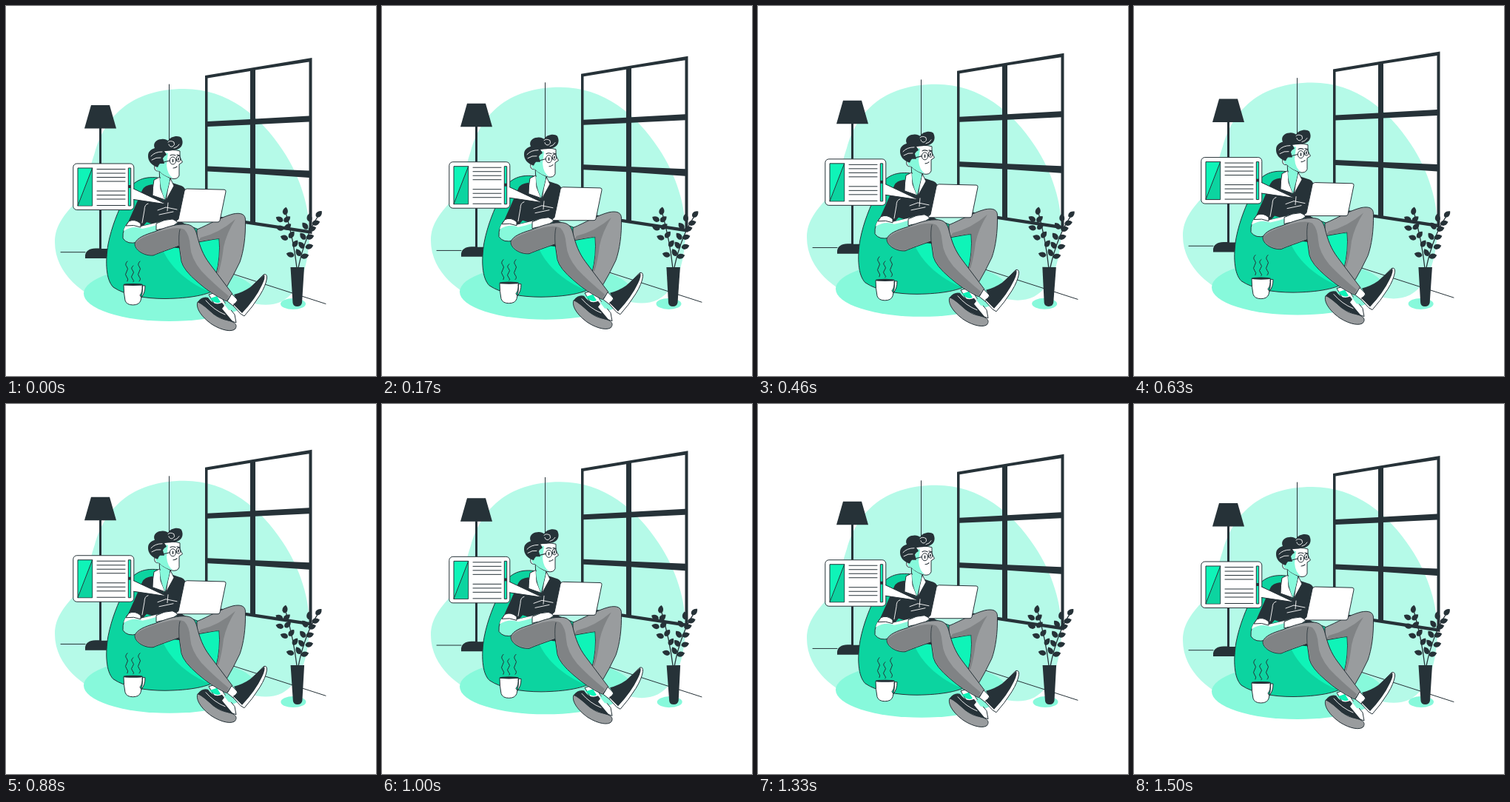
Write an HTML page that moves like this. It is 500x500 px and loops after 1.54 s.

```html
<!DOCTYPE html>
<html lang="en">
<head>
<meta charset="utf-8">
<style>
  html, body { margin: 0; width: 100%; height: 100%; overflow: hidden; background: #fff; }
  svg { display: block; width: 100vw; height: 100vh; }
  .ink { fill: #263238; }
  .line { fill: none; stroke: #263238; stroke-linecap: round; stroke-linejoin: round; }
  .edge { stroke: #263238; stroke-width: 1; stroke-linejoin: round; }
  .thin { fill: none; stroke: #fff; stroke-width: .9; stroke-linecap: round; }
  .white { fill: #fff; }
  .pale { fill: #b5fae8; }
  .mint { fill: #87f9db; }
  .bright { fill: #0ff4b8; }
  .green { fill: #0cd4a0; }
  .gray { fill: #999c9e; }
  .shade { fill: #808385; }
</style>
</head>
<body>
<svg viewBox="0 0 500 500">
  <g id="room">
    <path class="pale" d="M66 319C66 296 80 281 94 265C108 247 112 222 120 198C133 152 167 112 241 112C300 112 344 149 374 195C398 231 411 273 410 312C408 354 397 386 373 399C350 410 326 400 304 392L130 400C108 390 66 364 66 319Z"/>
    <ellipse class="mint" cx="221" cy="388.500" rx="116" ry="37.500"/>
    <path class="line" d="M220.500 106V185M74 332.700H107M300 360L432 402.500"/>

    <g class="ink">
      <path d="M115 134H140L149 165.500H106Z"/>
      <path d="M126 165H129V328H137.500V341H107V337Q108 328 121 327.500H126Z"/>
      <path fill-rule="evenodd" d="M269 94L413.500 70V308L269 286Z
        M272.500 97.500V156L330 153V88ZM337 86.500V152.500L409.500 148.500V75.500Z
        M272.500 163V216.500L330 219V160.500ZM337 160V219.500L409.500 222.500V156.500Z
        M272.500 223.500V282L330 291V226.500ZM337 227V292L409.500 303V232Z"/>
    </g>

    <!-- beanbag -->
    <path class="green edge" d="M205 232C185 230 170 236 161 257C151 279 143 297 138 322C134 346 135 370 145 380C161 391 188 395.500 215 395.500C248 395 274 391 289 380L300 330L288 313L230 290Z"/>
    <path class="bright" d="M212 330C221 350 240 370 270 384Q283 385 289 379L296 318L260 313Z"/>

    <!-- far leg and shoe -->
    <path class="gray edge" d="M258 315V302C275 295 291 285 307 281C317 279 324 281 323.500 290C324 312 321 332 316 346Q307 365 298 380L284 362Q290 340 288 314L260 319Z"/>
    <path class="shade" d="M260 318L263 313Q288 307 310 288Q298 307 294 326Q292 345 287 361L285 360Q290 338 288.500 314Z"/>
    <path class="white edge" d="M274 390L287 386L295 400L309 417L311 428L292 421Z"/>
    <path class="gray edge" d="M259 400C256 408 264 420 278 430C292 439 306 441 310 436C314 429 306 426 296 424C280 421 268 401 259 400Z"/>
    <path class="ink" d="M259 400Q265 392 273 394Q281 406 292 401L295 405L292 409L307 427Q292 424 281 417Q268 405 259 400Z"/>
    <path class="bright" d="M276 395L285 392L290 400Q283 404 276 395Z"/>
    <path class="thin" d="M270 398Q281 411 296 417"/>
    <path class="mint" d="M294 402L313 402L308 411L301 411Z"/>

    <!-- head -->
    <path class="mint edge" d="M207 219L208 240L213 262L222 239V231Z"/>
    <path class="white edge" d="M212 196Q225 193 235 196L235 205L238.500 211L234 214L234 229Q232 235 223 233Q211 228 207 223Q199 224 201 215L207 204Z"/>
    <path class="mint" d="M202 214Q205 211 208 213L213 205L215 198L219 199L217 215Q218 228 226 233Q213 230 207 223Q201 223 202 214Z"/>
    <path class="ink" d="M205 218C196 215 192 209 192 203C192 196 196 194 201 192C198 186 203 180 210 180C214 179 217 181 219 182C222 176 233 174 237 178C241 186 237 192 231 194Q222 196 214 196L217 201Q213 203 212 206L214 213L208 213Q206 215 205 218Z"/>
    <path class="thin" d="M196 203Q201 197 211 197M197 208Q203 204 209 205M219 184Q222 181 227 184Q229 188 225 190Q221 191 220 187M227 192Q232 191 234 187"/>
    <g class="line">
      <ellipse cx="225.500" cy="209" rx="4.200" ry="5"/>
      <ellipse cx="233" cy="206.500" rx="2.800" ry="4"/>
      <path d="M213 211L221 209M229.500 207.500H231M222 202Q225 200 229 202M231 201L235 202M226 219Q229 219 231 217" stroke-width="1.100"/>
      <path d="M225.500 207.500V210.500M233 205.500V208" stroke-width="1.600"/>
    </g>

    <!-- torso -->
    <path class="ink" d="M198 241Q187 242 184 249Q175 270 165 292L184 299L190 292L215 300L214 325L240 328L246 300L236 290L243 250Q241 243 234 242L222 238L213 263Z"/>
    <path class="white edge" d="M200 235L208 231L209 247L215 262L198 256Q198 245 200 235ZM222 233L227 243L216 263Q218 248 222 233Z"/>
    <path class="mint" d="M208 233L221 236L215 262Q208 247 208 233Z"/>
    <path class="thin" d="M192 267Q187 268 187 276L184 293M205 276L216 272L231 275M219 266L218 277M207 282L226 278"/>

    <!-- forearm -->
    <path class="mint edge" d="M166 291Q157 301 158 314Q164 323 178 319L205 307L231 295Q232 290 224 289Q212 289 203 293L182 298Z"/>
    <path class="white" d="M167 291Q160 297 159 304Q172 296 184 301Q204 297 215 291L203 293L182 298Z"/>
    <path class="white edge" d="M166 291Q174 287 182 294L182 299Q173 295 162 297Z"/>
    <path class="white edge" d="M203 294Q214 288 225 288L233 292L226 297L214 301Q208 301 203 303Z"/>

    <path class="white edge" d="M244.500 247L295 248.200Q297.500 248.500 297 251L289 290Q288.500 292 286 292H231Q228.500 291 233 288L241 250Q242 247 244.500 247Z"/>

    <!-- near leg and shoe -->
    <path class="gray edge" d="M174 321C177 313 188 309 201 305C216 299 228 295 239 295C252 294 256 301 258 309C262 325 266 336 275 348L306 389L298 399Q277 389 259 373Q240 357 237 345L234 324C220 329 208 333 199 337C187 338 174 330 174 321Z"/>
    <path class="shade" d="M175 321C180 313 199 307 217 302Q233 298 241 302Q248 309 249 325Q250 341 264 358Q279 374 301 392L298 398Q277 388 259 372Q241 357 238 345L234.500 323Q214 330 199 336C187 337 175 329 175 321Z"/>
    <path class="line" d="M234 324Q233 309 235 302" stroke-width=".8"/>
    <path class="white edge" d="M305 389L313 397L308 406L299 399Z"/>
    <path class="white edge" d="M348 363Q353 361 352.500 368Q351 378 343 391Q333 407 322 419L317 416L307 405Z"/>
    <path class="ink" d="M308 390Q320 387 330 380Q341 370 349 363Q351 367 346 377Q337 396 319 415L307 403L313 399Z"/>

    <!-- mug -->
    <path class="white edge" d="M184 378H188Q188 388 183 394L181 391Q185 386 184 378ZM159 377Q159 388 161 398Q163 404 171.500 404Q180 404 182 398Q185 388 184.500 377Z"/>
    <ellipse class="ink" cx="171.700" cy="376.500" rx="13" ry="1.600"/>
    <path class="line" d="M164 345q-4 4-1 7t0 7t0 7t1 6M172 351q-4 3-1 6t0 6t0 6t1 4M181 345q-4 4-1 7t0 7t0 7t0 6"/>

    <!-- card -->
    <rect class="white edge" x="90.800" y="213" width="82" height="62.500" rx="5"/>
    <path class="bright edge" d="M97 219H116.700V270H97ZM165.300 219H168.700V270H165.300Z"/>
    <path class="green" d="M116.200 221V269.500H98Z"/>
    <path class="line" d="M116.700 219L97 270M123 220.500H161M123 226H161M123 231.500H161M123 237H161M123 250H161M123 255.500H161M123 261H161M123 269.500H161"/>
    <path class="white" d="M170 246L217 268L170 261Z"/>
    <path class="line" d="M172.500 247L217 268L172.500 261.500"/>
    <path class="ink" d="M165 242H169V246H165Z"/>
  </g>

  <g id="plant">
    <ellipse class="mint" cx="388" cy="402.500" rx="17" ry="7.500"/>
    <path class="ink" d="M384.500 353H403L400 401Q399 406 393.500 406Q388 406 387.500 401Z"/>
    <path class="line" stroke-width="1.300" d="M393 354Q389 318 378 279M395 354Q404 310 423 282"/>
    <g id="leaves" class="ink"></g>
  </g>
</svg>
<script>
  const room = document.getElementById('room');
  const plant = document.getElementById('plant');

  // x, y, angle
  const leaves = [
    [377.5, 277, 100], [369.5, 288, 30], [380, 288, 140], [370, 300, 15], [381, 298, 140],
    [376, 313, 20], [386, 309, 130], [391, 321, 125], [384, 336, 15],
    [423, 281, 135], [419, 293, 165], [410, 286, 85], [414, 301, 165], [404, 297, 50],
    [411, 312, 165], [401, 311, 50], [410, 325, 165], [399, 323, 50], [404, 338, 165], [395, 333, 60]
  ];
  document.getElementById('leaves').innerHTML = leaves.map(([x, y, angle]) =>
    `<path d="M-6 0Q-2-5 3-3.600Q6-2 6 0Q6 2 3 3.600Q-2 5-6 0Z"
      transform="translate(${x} ${y}) rotate(${angle})scale(.9)"/>`).join('');

  const LOOP = 1540, CYCLE = 1500;

  // Linear wave: 0 at the ends of the cycle, 1 halfway
  const triangle = p => 1 - Math.abs(1 - 2 * (((p % 1) + 1) % 1));

  function draw(now) {
    const p = Math.min(now % LOOP, CYCLE) / CYCLE;
    room.setAttribute('transform', `translate(0 ${-10 * triangle(p)})`);
    plant.setAttribute('transform', `rotate(${2 * triangle(p + .25) - 1} 399 341)`);
    requestAnimationFrame(() => draw(performance.now() - start));
  }
  const start = performance.now();
  draw(0);
</script>
</body>
</html>
```
